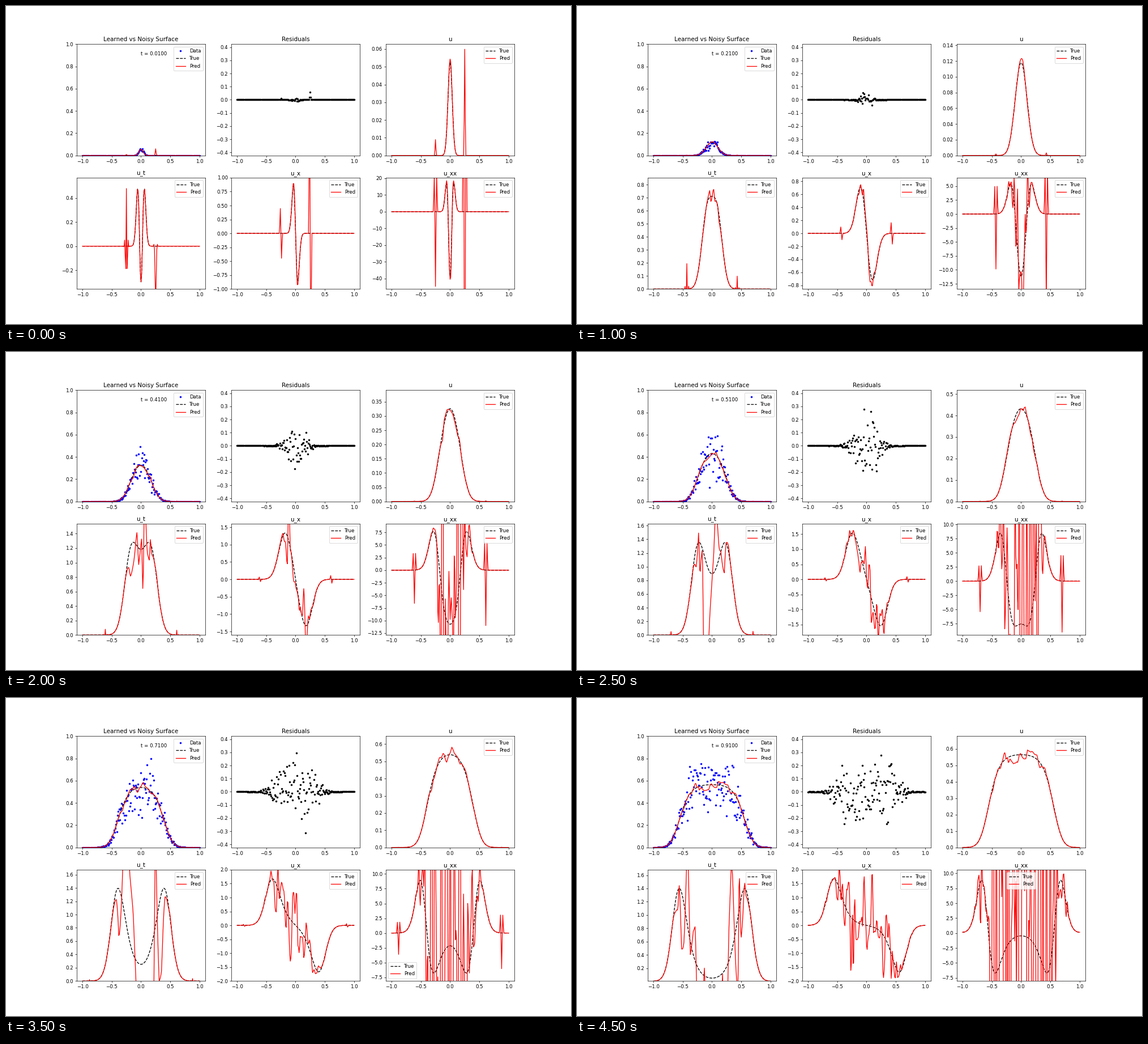
Recreate the animation shown at these times as a matplotlib script. Size 998 by 561 pixels, loop 5000 ms.

```python
import numpy as np
import matplotlib.pyplot as plt
from matplotlib.animation import FuncAnimation

DIFF, RATE, CAP = 0.02, 10.0, 0.57
FRAMES, INTERVAL = 10, 500
DX, DT = 0.005, 1e-4
STEP = 2  # fine grid points per plotted point
fine = np.linspace(-1, 1, 401)
x = fine[::STEP]
H = DX * STEP


def slope(u):
    p = np.pad(u, 1, mode="reflect")
    uxx = (p[2:] - 2 * u + p[:-2]) / DX**2
    return DIFF * uxx + RATE * u * (1 - u / CAP), uxx


def simulate():
    """Logistic growth with diffusion, stored every 0.1 time units."""
    u = 0.0523 * np.exp(-fine**2 / 0.0027)
    states = []
    for k in range(FRAMES):
        if k:
            for _ in range(round(0.1 / DT)):
                u = u + DT * slope(u)[0]
        ut, uxx = slope(u)
        states.append([a[::STEP] for a in (u, ut, np.gradient(u, DX), uxx)])
    return states


def wander(rng, gap, mean=0):
    """Straight lines between random heights at uneven places."""
    n = int(3 / gap)
    px = np.cumsum(rng.uniform(0.4, 1.6, n) * gap) - 1.1
    return np.interp(x, px, rng.normal(mean, 1, n))


def bump(pos, width=0.015):
    return np.maximum(0, 1 - np.abs(x - pos) / width)


def ripple(pos):
    return np.exp(-((x - pos) / 0.02)**2) * np.cos(np.pi * (x - pos) / 0.015)


def build(k, state):
    rng = np.random.default_rng(40 + k)
    u, ut, ux, uxx = state
    t = 0.01 + 0.1 * k
    shape = u / u.max()

    # fitted surface: errors grow with the height of the wave
    err = u.max() * shape**1.4 * (0.05 * wander(rng, 0.06)
                                  + 0.025 * wander(rng, 0.03))
    err_t = min(1.8, 4.5 * t**2) * shape**2 * wander(rng, 0.04, mean=-0.4)

    # spikes where the fit meets the flat part, moving outwards and fading
    edge = 0.25 + 0.9 * (t - 0.01)
    start = np.exp(-40 * (t - 0.01))
    fade = np.exp(-2 * t)
    err = err + (0.005 * fade + 0.055 * start) * bump(edge)
    err = err + (0.003 * fade + 0.006 * start) * bump(-edge)
    err_t = err_t + 0.5 * np.exp(-4.5 * t) * ripple(-edge)
    err_t = err_t + 0.15 * np.exp(-2 * t) * ripple(edge) - 0.6 * start * bump(edge)

    # the ends lift for a moment as the edge reaches them
    lift = np.exp(-((edge - 0.97) / 0.03)**2)
    left = np.exp(-(x + 1) / 0.04)
    err = err - 0.01 * lift * left
    err_t = err_t + lift * (0.43 * left + 0.27 * np.exp((x - 1) / 0.02))

    err_x = np.gradient(err, H)
    pred = [u + err, ut + err_t, ux + err_x, uxx + np.gradient(err_x, H)]
    data = u * (1 + 0.24 * rng.normal(size=len(x)))
    return t, data, state, pred


def limits(name, v):
    lo, hi = 1.2 * v.min(), 1.2 * v.max()
    if name == "u" or (name == "u_t" and 0 < lo < 0.001):
        lo = 0
    if name == "u_x":
        if abs(hi - round(hi)) < 0.04:
            hi = round(hi)
        lo = -hi
    return lo, hi


series = [build(k, s) for k, s in enumerate(simulate())]

fig, axes = plt.subplots(2, 3, figsize=(16, 8.994), dpi=62.375)
surf, resid = axes[0, :2]
panels = [axes[0, 2], *axes[1]]
names = ["u", "u_t", "u_x", "u_xx"]

for ax, title in zip(axes.flat, ["Learned vs Noisy Surface", "Residuals"] + names):
    ax.set_title(title)
    ax.set_xlim(-1.1, 1.1)


def pair(ax):
    return (ax.plot(x, 0 * x, "k--", label="True")[0],
            ax.plot(x, 0 * x, "r-", label="Pred")[0])


dots, = surf.plot(x, 0 * x, "b.", label="Data")
surf_lines = pair(surf)
surf.set_ylim(0, 1)
surf.legend(loc="upper right")
clock = surf.text(0, 0.9, "")
res_dots, = resid.plot(x, 0 * x, "k.")
resid.set_ylim(-0.423, 0.423)
lines = [pair(ax) for ax in panels]
legends = [ax.legend(loc="upper right") for ax in panels]
PLACES = {7: "lower left", 8: "lower right", 9: "upper center"}


def update(k):
    t, data, true, pred = series[k]
    dots.set_ydata(data)
    surf_lines[0].set_ydata(true[0])
    surf_lines[1].set_ydata(pred[0])
    clock.set_text(f"t = {t:.4f}")
    res_dots.set_ydata(pred[0] - data)
    for ax, name, (a, b), v, p in zip(panels, names, lines, true, pred):
        a.set_ydata(v)
        b.set_ydata(p)
        ax.set_ylim(*limits(name, v))
    legends[3].set_loc(PLACES.get(k, "upper right"))
    return []


anim = FuncAnimation(fig, update, frames=FRAMES, init_func=lambda: update(0),
                     interval=INTERVAL, repeat=True, repeat_delay=0, blit=False)
plt.show()
```
